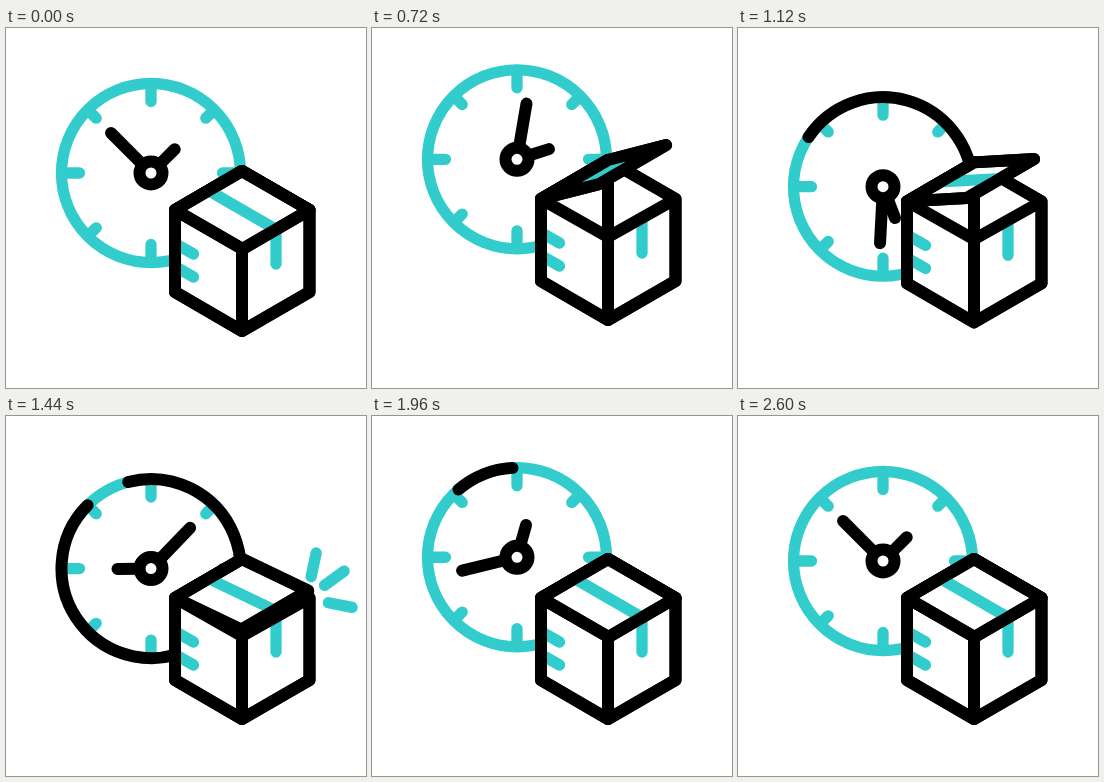
Animation of 360x360 px, one loop 3000 ms. Source, as an HTML page:

```html
<!DOCTYPE html>
<html lang="en">
<head>
<meta charset="utf-8">
<title>Delivery time</title>
<style>
  html, body { margin: 0; width: 100%; height: 100%; overflow: hidden; background: #fff; }
  svg { display: block; width: 100vw; height: 100vh; }
  path, circle { fill: none; stroke: #000; stroke-width: 12; stroke-linecap: round; stroke-linejoin: round; }
  .teal { stroke: #33cccc; stroke-width: 11.3; }
  .paper { fill: #fff; }
</style>
</head>
<body>
<svg viewBox="0 0 360 360">
  <g id="clock">
    <path id="ticks" class="teal"/>
    <circle class="teal" r="89.5"/>
    <path id="arc"/>
    <path id="minute" d="M0-11.5V-56.5"/>
    <path id="hour" d="M0-11.5V-33.5"/>
    <circle class="paper" r="11.5"/>
  </g>
  <path id="sparks" class="teal"/>
  <g id="box">
    <path class="paper" d="M169 182L236 143L303.500 182V264L236 303L169 264Z"/>
    <path class="teal" d="M169 215.500L187.500 226M169 238.500L187.500 249M270 201V236"/>
    <path d="M169 182L236 143L303.500 182V264L236 303L169 264ZL236 220L303.500 182M236 143V303"/>
    <path id="lidFill" class="paper"/>
    <path id="lidTape" class="teal"/>
    <path id="lidEdge"/>
  </g>
</svg>
<script>
const LOOP = 3000, STEP = 40;
const $ = id => document.getElementById(id);
const set = (id, name, value) => $(id).setAttribute(name, value);
const clamp = x => Math.max(0, Math.min(1, x));
const span = (t, a, b) => clamp((t - a) / (b - a));
const sine = x => (1 - Math.cos(Math.PI * x)) / 2;

// Bezier easing with handles (x1, 0) and (x2, 1), solved by bisection
function ease(x, x1, x2) {
  let lo = 0, hi = 1, s = .5;
  for (let i = 0; i < 24; i++) {
    s = (lo + hi) / 2;
    const r = 1 - s;
    if (3 * s * r * r * x1 + 3 * s * s * r * x2 + s ** 3 < x) lo = s;
    else hi = s;
  }
  return s * s * (3 - 2 * s);
}

// Point on a circle, angle clockwise from twelve o'clock
function polar(deg, r, cx = 0, cy = 0) {
  const a = deg * Math.PI / 180;
  return (cx + r * Math.sin(a)).toFixed(2) + ' ' + (cy - r * Math.cos(a)).toFixed(2);
}

function ray(deg, r1, r2, cx, cy) {
  return 'M' + polar(deg, r1, cx, cy) + 'L' + polar(deg, r2, cx, cy);
}

let ticks = '';
for (let i = 0; i < 8; i++) ticks += ray(i * 45, 89, i % 2 ? 77.5 : 71.5);
set('ticks', 'd', ticks);

const bobKeys = [[200, 145], [690, 131], [1150, 159], [1860, 141], [2460, 145]];

function bob(t) {
  let y = bobKeys[0][1];
  for (let i = 1; i < bobKeys.length; i++) {
    const [t0, y0] = bobKeys[i - 1], [t1, y1] = bobKeys[i];
    if (t >= t0) y = y0 + (y1 - y0) * sine(span(t, t0, t1));
  }
  return y;
}

function drawClock(t) {
  const turn = ease(span(t, 200, 2600), .53, .37);
  set('clock', 'transform', `translate(145 ${bob(t).toFixed(2)})`);
  set('minute', 'transform', `rotate(${-45 + 720 * turn})`);
  set('hour', 'transform', `rotate(${45 + 360 * turn})`);

  const offset = -96 * (1 - turn) ** 1.4;
  const head = 360 * sine(span(t, 780, 1560));
  const tail = 360 * sine(span(t, 1360, 2120));
  let d = '';
  if (head - tail > .5) {
    const a = offset + tail, b = offset + head, mid = (a + b) / 2;
    const to = deg => 'A89.5 89.5 0 0 1 ' + polar(deg, 89.5);
    d = 'M' + polar(a, 89.5) + to(mid) + to(b);
  }
  set('arc', 'd', d);
}

function drawBox(t) {
  const lift = 1 - Math.min(1, Math.abs((t - 785) / 545)) ** 3.15;
  const hop = span(t, 1320, 1550);
  const open = lift + .54 * hop * (1 - hop);
  set('box', 'transform', `translate(0 ${(-11 * lift).toFixed(2)})`);

  const dx = 67.5 - 9.5 * open, dy = 39 - 54 * open;
  const lid = `M169 182L236 143l${dx} ${dy}L${169 + dx} ${182 + dy}Z`;
  set('lidFill', 'd', lid);
  set('lidEdge', 'd', lid);
  set('lidTape', 'd', `M202.5 162.5l${dx} ${dy}`);
}

function drawSparks(t) {
  const outer = 51 * (1 - (1 - span(t, 1240, 1600)) ** 3);
  const inner = 51 * span(t, 1300, 1620);
  set('sparks', 'd', outer - inner > .5
    ? [12, 54, 101].map(a => ray(a, inner, outer, 300.5, 182.5)).join('') : '');
}

function draw(now) {
  const t = Math.floor((now % LOOP) / STEP) * STEP;
  drawClock(t);
  drawBox(t);
  drawSparks(t);
}

let start = null;
function tick(now) {
  if (start === null) start = now;
  draw(now - start);
  requestAnimationFrame(tick);
}
draw(0);
requestAnimationFrame(tick);
</script>
</body>
</html>
```
